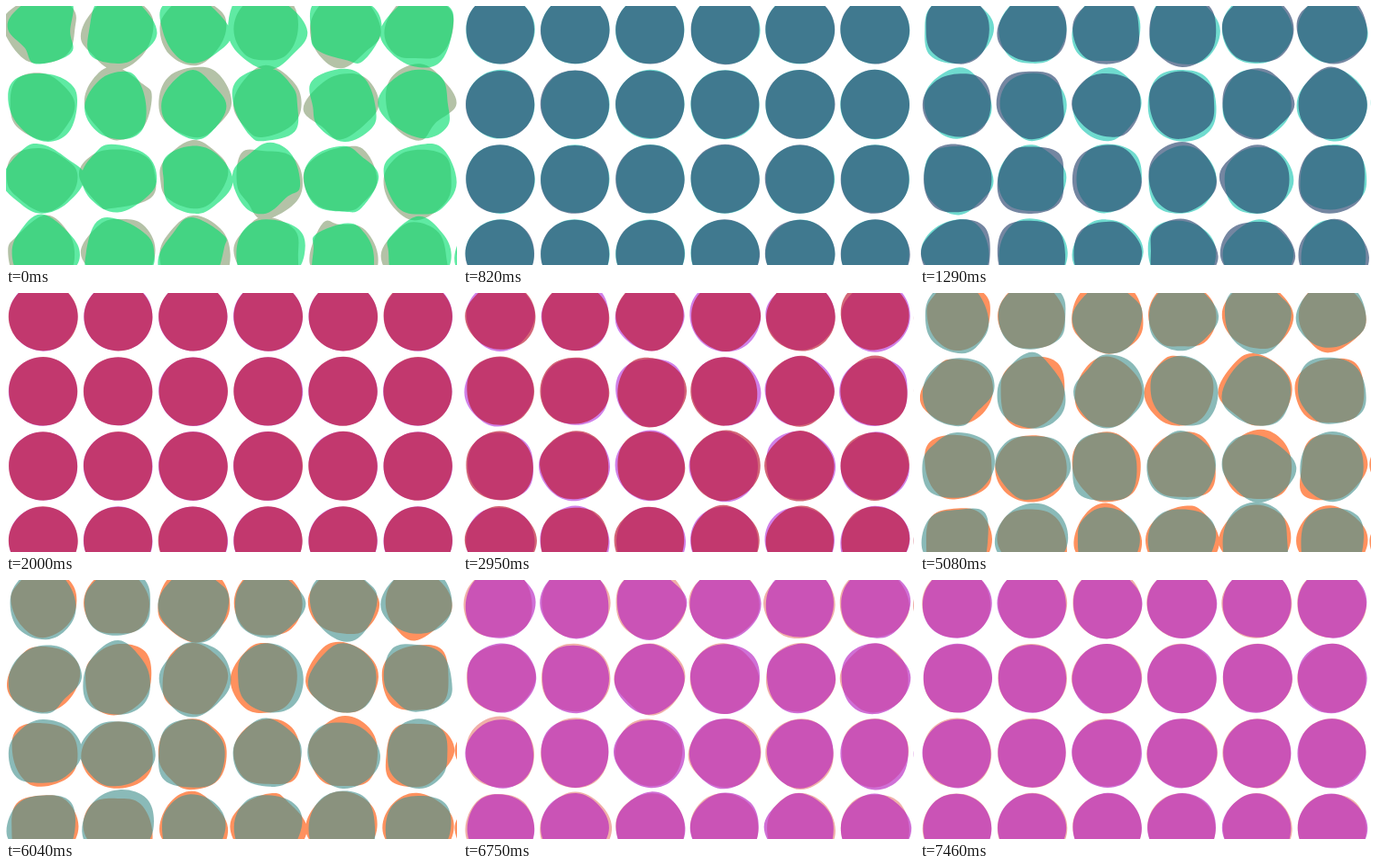
Animation, 500 px wide and 288 px high, one loop 7560 ms. Source, as an HTML page with a canvas:

```html
<!DOCTYPE html>
<html lang="en">
<head>
<meta charset="utf-8">
<title>Wobbling dots</title>
<style>
  html, body { margin: 0; width: 100%; height: 100%; overflow: hidden; background: #fff; }
  canvas { display: block; width: 500px; height: 288px; }
</style>
</head>
<body>
<canvas id="stage" width="500" height="288"></canvas>
<script>
const LOOP = 7560, STEP = 237.2, FIRST = 100;
const COLS = 7, ROWS = 4, PITCH = 83.1, LEFT = 41.2, TOP = 26.3, RADIUS = 38.2;
const POINTS = 8, HANDLE = 0.1875, TOP_ALPHA = 0.64;

// Each scene picks new colours and new shapes.
const scenes = [
  { start: 0,    back: '#b4c2a7', front: '#06de6f' },
  { start: 800,  back: '#6fdbcf', front: '#26426d' },
  { start: 1800, back: '#d080e8', front: '#ba102b' },
  { start: 3150, back: '#8f64e4', front: '#be6de6' },
  { start: 4500, back: '#ff915e', front: '#489391' },
  { start: 6550, back: '#f0b0a8', front: '#b620bf' }
];

// How far the outline points stray, in pixels: [time, amount].
const bulge = [
  [0, 8.5], [800, 0.8], [1120, 4.6], [1290, 4.2], [1800, 0.4], [2000, 0.5],
  [2600, 6.5], [3150, 0.6], [3900, 7.5], [4500, 1], [5080, 8], [6040, 5.5],
  [6550, 0.6], [6950, 5], [7460, 1.3], [7560, 1]
];

const ctx = document.getElementById('stage').getContext('2d');

function randomFrom(seed) {
  return () => {
    seed = (seed + 0x6D2B79F5) | 0;
    let n = Math.imul(seed ^ (seed >>> 15), 1 | seed);
    n = (n + Math.imul(n ^ (n >>> 7), 61 | n)) ^ n;
    return ((n ^ (n >>> 14)) >>> 0) / 4294967296;
  };
}

function bulgeAt(time) {
  const i = Math.max(1, bulge.findIndex(key => key[0] >= time));
  const [t0, a] = bulge[i - 1], [t1, b] = bulge[i];
  const ease = (1 - Math.cos(Math.PI * (time - t0) / (t1 - t0))) / 2;
  return a + (b - a) * ease;
}

function addBlob(cx, cy, amount, time, random) {
  const stray = () => {
    const u = random() * 2 - 1;
    const drift = 0.85 + 0.25 * Math.sin(time / 420 + random() * 6.28);
    return amount * drift * u * Math.sqrt(Math.abs(u));
  };
  // Points sit at fixed angles and wander in both directions.
  const pts = Array.from({ length: POINTS }, (_, i) => {
    const angle = i * 2 * Math.PI / POINTS;
    return [cx + RADIUS * Math.cos(angle) + stray(), cy + RADIUS * Math.sin(angle) + stray()];
  });
  const at = i => pts[(i + POINTS) % POINTS];
  const handle = (i, side) =>
    at(i).map((v, axis) => v + side * HANDLE * (at(i + 1)[axis] - at(i - 1)[axis]));

  ctx.moveTo(...pts[0]);
  for (let i = 0; i < POINTS; i++) {
    ctx.bezierCurveTo(...handle(i, 1), ...handle(i + 1, -1), ...at(i + 1));
  }
  ctx.closePath();
}

function drawLayer(color, alpha, amount, time, random) {
  ctx.globalAlpha = alpha;
  ctx.fillStyle = color;
  ctx.beginPath();
  for (let row = 0; row < ROWS; row++) {
    for (let col = 0; col < COLS; col++) {
      addBlob(LEFT + col * PITCH, TOP + row * PITCH, amount, time, random);
    }
  }
  ctx.fill();
}

function draw(time) {
  const index = scenes.filter(s => s.start <= time).length - 1;
  const { back, front } = scenes[index];
  const random = randomFrom(101 + index * 977);
  const amount = bulgeAt(time);
  ctx.globalAlpha = 1;
  ctx.fillStyle = '#fff';
  ctx.fillRect(0, 0, 500, 288);
  drawLayer(back, 1, amount, time, random);
  drawLayer(front, TOP_ALPHA, amount, time, random);
}

const begin = performance.now();
let shown = -1;

function tick() {
  const t = Math.max(0, performance.now() - begin) % LOOP;
  const held = t < FIRST ? 0 : FIRST + STEP * Math.floor((t - FIRST) / STEP);
  if (held !== shown) draw(shown = held);
  requestAnimationFrame(tick);
}
tick();
</script>
</body>
</html>
```
